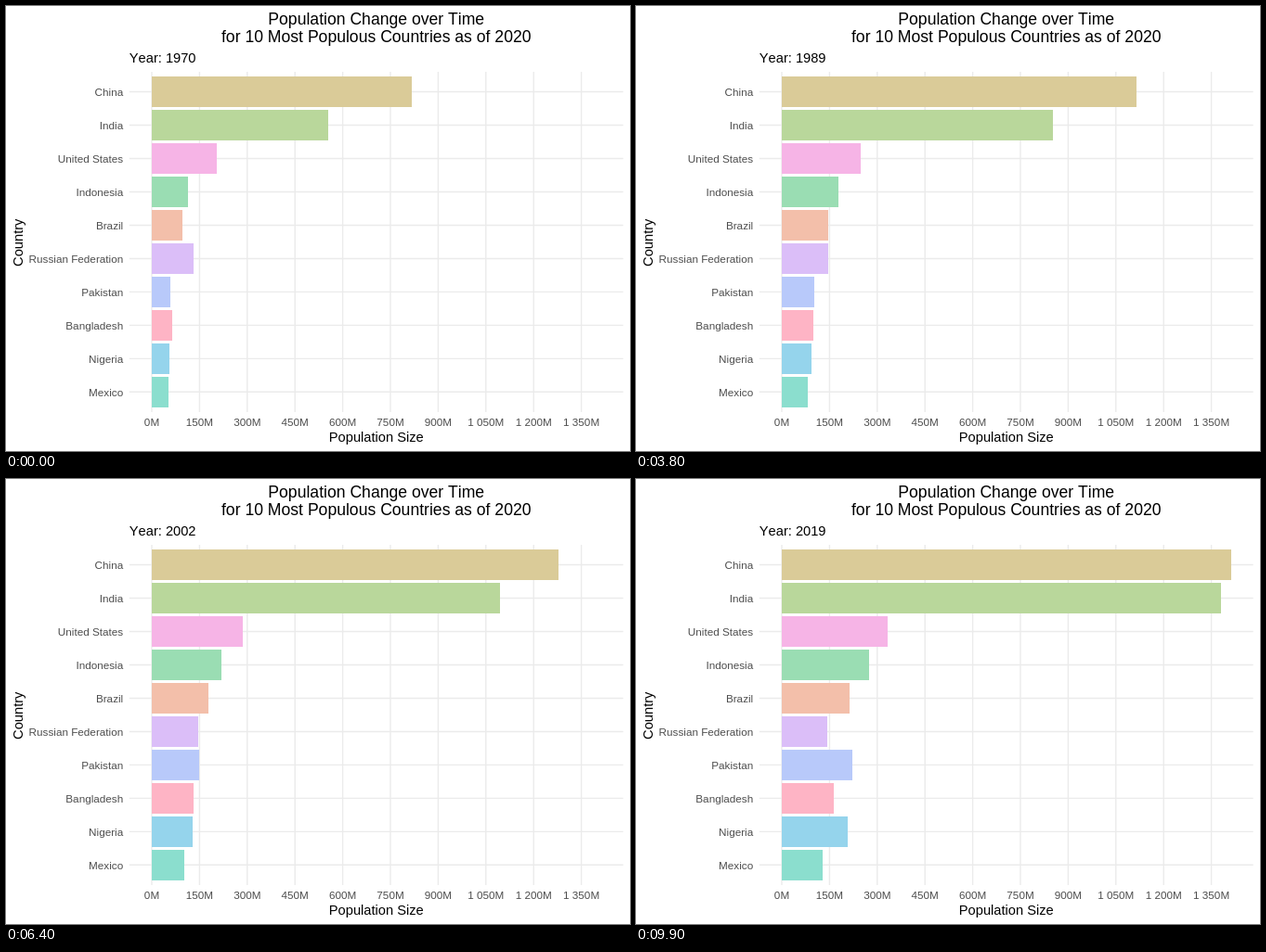
Animation of 672x480 px, one loop 10000 ms. Source, as an HTML page with a canvas:

```html
<!DOCTYPE html>
<html lang="en">
<head>
<meta charset="utf-8">
<title>Population Change over Time</title>
<style>
  html, body { margin: 0; width: 100%; height: 100%; overflow: hidden; background: #fff; }
  canvas { display: block; width: 672px; height: 480px; }
</style>
</head>
<body>
<canvas id="stage" width="672" height="480"></canvas>
<script>
const ctx = document.getElementById('stage').getContext('2d');

const LOOP = 10000, STEP = 100, FIRST_YEAR = 1970, YEARS = 50;
const LEFT = 132.8, RIGHT = 664.67, TOP = 71, BOTTOM = 437.9;
const ZERO = 157, SCALE = 51.4 / 150;
const ROW = (BOTTOM - TOP) / 10.2;
const MID_X = (LEFT + RIGHT) / 2, MID_Y = (TOP + BOTTOM) / 2;

// Name, colour, first and last population in millions, then the bends between them
const countries = [
  ['China', '#dacb98', 818.3, 1411.1, 85, -2.9, -2.3, 5.4, 6.4],
  ['India', '#b9d79b', 555.2, 1380, -2.6, -19.4],
  ['United States', '#f6b4e6', 205.1, 331.5, -1.9, -3.8],
  ['Indonesia', '#9addb3', 114.8, 273.5, 2.1, 0.7],
  ['Brazil', '#f3bfaa', 95.1, 212.6, 8.2, -2.2],
  ['Russian Federation', '#dbbef8', 130.4, 144.1, 9.2, 2.6, -1.8],
  ['Pakistan', '#b8c9fa', 58.1, 220.9, -16.3, -1.8],
  ['Bangladesh', '#feb4c5', 64.2, 164.7, 0.3, -4.2],
  ['Nigeria', '#95d4ec', 56, 206.1, -24.2, 2.5],
  ['Mexico', '#8bdece', 51.5, 128.9, 1.2]
];

const rowY = i => TOP + (0.6 + i) * ROW;

// Straight growth from first to last, bent by sine waves of rising frequency
const population = (first, last, bends, u) => bends.reduce(
  (sum, bend, k) => sum + bend * Math.sin((k + 1) * Math.PI * u),
  first + (last - first) * u
);

function text(str, x, y, size, align = 'center', color = '#000') {
  ctx.font = size + 'px "Liberation Sans", Arial, Helvetica, sans-serif';
  ctx.fontKerning = 'none';
  ctx.textAlign = align;
  ctx.fillStyle = color;
  ctx.fillText(str, x, y);
}

function line(x1, y1, x2, y2) {
  ctx.beginPath();
  ctx.moveTo(x1, y1);
  ctx.lineTo(x2, y2);
  ctx.stroke();
}

function bar(y, width, color) {
  const top = Math.round(y - 0.45 * ROW), bottom = Math.round(y + 0.45 * ROW);
  ctx.fillStyle = color;
  ctx.fillRect(ZERO, top, Math.round(width), bottom - top);
}

function drawAxes() {
  ctx.strokeStyle = '#ebebeb';
  ctx.lineWidth = 1.42;
  countries.forEach(([name], i) => {
    line(LEFT, rowY(i), RIGHT, rowY(i));
    text(name, 126.2, rowY(i) + 4.2, 11.73, 'right', '#4d4d4d');
  });
  for (let m = 0; m <= 1350; m += 150) {
    const x = ZERO + m * SCALE;
    const label = m < 1000 ? m + 'M' : '1 ' + String(m - 1000).padStart(3, '0') + 'M';
    line(x, TOP, x, BOTTOM);
    text(label, x, 453, 11.73, 'center', '#4d4d4d');
  }
  text('Population Size', MID_X, 469.6, 14.67);
  ctx.save();
  ctx.translate(17.8, MID_Y + 0.8);
  ctx.rotate(-Math.PI / 2);
  text('Country', 0, 0, 14.67);
  ctx.restore();
}

function draw(time) {
  // Bars advance on odd steps, the year label on even ones
  const step = Math.floor(time % LOOP / STEP);
  const u = Math.ceil(step / 2) / YEARS;
  const year = FIRST_YEAR + Math.floor(step / 2);

  ctx.fillStyle = '#fff';
  ctx.fillRect(0, 0, 672, 480);
  drawAxes();
  countries.forEach(([, color, first, last, ...bends], i) => {
    bar(rowY(i), population(first, last, bends, u) * SCALE, color);
  });
  text('Population Change over Time', MID_X, 20, 17.6);
  text('for 10 Most Populous Countries as of 2020', MID_X, 39, 17.6);
  text('Year: ' + year, LEFT, 60.7, 14.67, 'left');
}

const start = performance.now();
function tick() {
  draw(performance.now() - start);
  requestAnimationFrame(tick);
}
tick();
</script>
</body>
</html>
```
